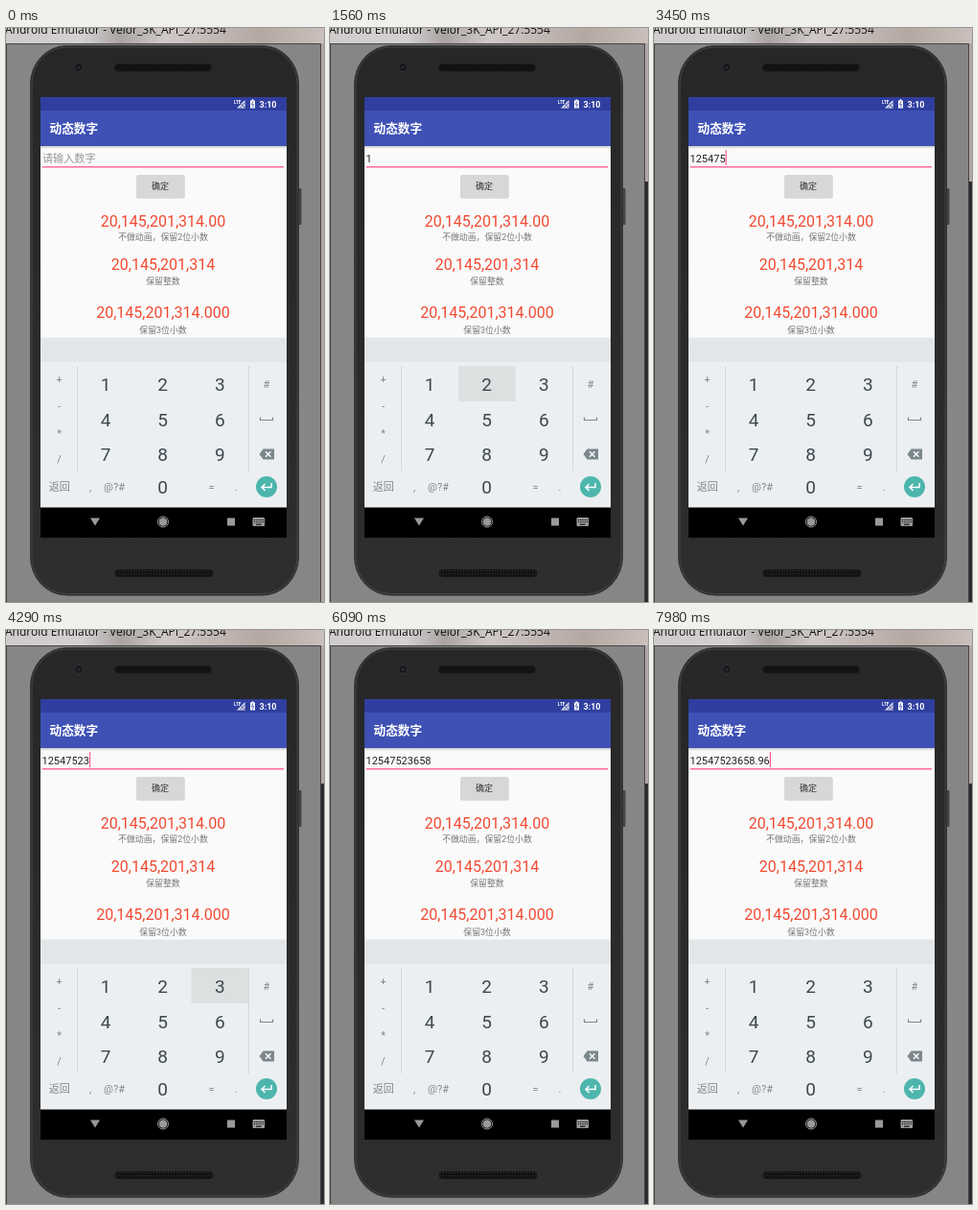
Write an HTML page that moves like this. It is 332x598 px and loops after 8 s.

```html
<!DOCTYPE html>
<html lang="zh-CN">
<head>
<meta charset="utf-8">
<title>动态数字</title>
<style>
  html, body { margin: 0; width: 100%; height: 100%; overflow: hidden; background: #868686; }
  svg { display: block; }
  text { font-family: Roboto, "Noto Sans CJK SC", "Noto Sans CJK", sans-serif; }
  .mid { text-anchor: middle; }
  .sum { font-size: 16px; fill: #f24a32; }
  .note { font-size: 8.9px; fill: #777; }
  .digit { font-size: 19px; fill: #3c484e; }
  .sign { font-size: 11px; fill: #7b878d; }
</style>
</head>
<body>
<svg id="stage" width="332" height="598" viewBox="0 0 332 598">
  <defs>
    <linearGradient id="bar">
      <stop offset="0" stop-color="#d0cccc"/>
      <stop offset=".24" stop-color="#d4d0d0"/>
      <stop offset=".36" stop-color="#aaa4a3"/>
      <stop offset=".5" stop-color="#cfc9c8"/>
      <stop offset=".8" stop-color="#b5a8a3"/>
      <stop offset="1" stop-color="#cabfba"/>
    </linearGradient>
    <linearGradient id="shell" x2="0" y2="1">
      <stop offset="0" stop-color="#272728"/>
      <stop offset="1" stop-color="#2e2e2f"/>
    </linearGradient>
    <linearGradient id="shade" x2="0" y2="1">
      <stop offset="0" stop-color="#000" stop-opacity=".2"/>
      <stop offset="1" stop-color="#000" stop-opacity="0"/>
    </linearGradient>
    <pattern id="mesh" width="3" height="3" patternUnits="userSpaceOnUse">
      <rect width="3" height="3" fill="#111"/>
      <circle cx="1.5" cy="1.5" r=".7" fill="#303030"/>
    </pattern>
  </defs>

  <!-- emulator window -->
  <rect width="332" height="598" fill="#868686"/>
  <rect width="332" height="16" fill="url(#bar)"/>
  <text x="-1" y="6" style="font:12px 'Open Sans','Noto Sans',sans-serif" fill="#111">Android Emulator - Velor_3K_API_27:5554</text>
  <path d="M0 16.5H328.5V598M.5 16V598" fill="none" stroke="#444"/>
  <rect x="329" y="16" width="3" height="582" fill="#b0a8a6"/>
  <rect id="edge" x="329" y="160" width="3" height="438" fill="#2b2b30"/>

  <!-- phone -->
  <rect x="304" y="167" width="4.5" height="38" rx="1" fill="#444"/>
  <rect x="25.5" y="18.5" width="280" height="572.5" rx="38" ry="40" fill="url(#shell)" stroke="#333"/>
  <rect x="27" y="20" width="277" height="569.5" rx="36.5" ry="38.5" fill="none" stroke="#454545"/>
  <circle cx="76" cy="41" r="4.5" fill="#171719" stroke="#333335"/>
  <circle cx="76" cy="41" r="1.6" fill="#2b2e3b"/>
  <rect x="113.5" y="37.5" width="101" height="7.5" rx="3.7" fill="#121212" stroke="#1b1b1b"/>
  <rect x="114" y="564.5" width="102" height="7" rx="3.5" fill="url(#mesh)" stroke="#151515"/>

  <!-- app -->
  <rect x="36" y="72" width="257" height="459" fill="#fafafa"/>
  <rect x="36" y="72" width="257" height="14" fill="#303f9f"/>
  <rect x="36" y="86" width="257" height="37" fill="#3f51b5"/>
  <rect x="36" y="123" width="257" height="3" fill="url(#shade)"/>
  <g fill="#fff">
    <text x="238" y="79" font-size="4.5" font-weight="700">LTE</text>
    <path d="M241 83.5L249.5 75V83.5Z" opacity=".85"/>
    <path d="M255 75.5H256.5V74.5H258.5V75.5H260V83.5H255Z"/>
    <text x="264.5" y="82.5" font-size="9" font-weight="700">3:10</text>
    <text x="45.5" y="108.7" font-size="12.7" font-weight="700">动态数字</text>
  </g>
  <path d="M244.5 78L249 83M249 78L244.5 83" stroke="#303f9f" stroke-width=".8"/>
  <path d="M257.8 76.5L256.4 79.7H258.6L257.3 82.5" fill="none" stroke="#303f9f" stroke-width=".8"/>
  <text id="hint" x="38" y="139.5" font-size="11.1" fill="#989898">请输入数字</text>
  <text id="entry" x="37.5" y="139.5" font-size="11" fill="#222"></text>
  <rect id="caret" y="127" width="1.2" height="16" fill="#ff5c93"/>
  <rect x="38" y="144" width="252" height="1.5" fill="#ff6b9d"/>
  <rect x="136" y="154" width="50.5" height="23.5" rx="2" fill="#c8c8c8"/>
  <rect x="136" y="153" width="50.5" height="24" rx="2" fill="#d6d7d7"/>
  <text class="mid" x="161" y="168.3" font-size="9" font-weight="500" fill="#333">确定</text>
  <text class="mid sum" x="164" y="206.5">20,145,201,314.00</text>
  <text class="mid note" x="164" y="221.3">不做动画，保留2位小数</text>
  <text class="mid sum" x="164" y="251.7">20,145,201,314</text>
  <text class="mid note" x="164" y="266.5">保留整数</text>
  <text class="mid sum" x="164" y="302">20,145,201,314.000</text>
  <text class="mid note" x="164" y="317.5">保留3位小数</text>

  <!-- keyboard -->
  <rect x="36" y="322.5" width="257" height="26" fill="#e2e6e8"/>
  <rect x="36" y="348" width="257" height="151.5" fill="#eceff1"/>
  <path d="M74.5 352V462M253.5 352V462" stroke="#d3d9dc"/>
  <rect id="press" fill="#dce0e1"/>
  <g id="keys"></g>
  <path d="M265.5 405.5V408.5H278.5V405.5" fill="none" stroke="#7b878d" stroke-width="1.2"/>
  <path d="M264.5 444L268.5 438.5H280V449.5H268.5Z" fill="#7b878d"/>
  <path d="M271 441.2L276.5 446.8M276.5 441.2L271 446.8" stroke="#fff" stroke-width="1.4"/>
  <circle cx="272" cy="478" r="11" fill="#4db6ac"/>
  <path d="M277 474V478.5H267M270.5 475L267 478.5L270.5 482" fill="none" stroke="#fff" stroke-width="1.5"/>

  <!-- navigation -->
  <rect x="36" y="499.5" width="257" height="31.5" fill="#000"/>
  <g fill="#9a9a9a">
    <path d="M88 510.5H98L93 518.5Z"/>
    <circle cx="164" cy="514.5" r="4.3"/>
    <circle cx="164" cy="514.5" r="5.5" fill="none" stroke="#9a9a9a"/>
    <rect x="231" y="510.5" width="8" height="8"/>
    <rect x="257.5" y="510" width="12.5" height="9" rx="1"/>
  </g>
  <path d="M259 512.5H269M259 514.7H269" stroke="#000" stroke-dasharray="1.2 1"/>
  <path d="M261 517.2H266.5" stroke="#000"/>
</svg>
<script>
const LOOP = 8000;
const $ = id => document.getElementById(id);

// key, pressed at, typed at, released at
const strokes = [
  ["1", 990, 1080, 1110], ["2", 1560, 1620, 1650], ["5", 1920, 2070, 2070],
  ["4", 2370, 2550, 2550], ["7", 2850, 2910, 2940], ["5", 3270, 3360, 3450],
  ["2", 3780, 3840, 3870], ["3", 4170, 4260, 4350], ["6", 4590, 4650, 4650],
  ["5", 5100, 5160, 5190], ["8", 5550, 5610, 5670], [".", 6750, 6810, 6960],
  ["9", 7380, 7590, 7590], ["6", 7860, 7920, 7980]
];

function label(text, x, y, kind) {
  const el = document.createElementNS("http://www.w3.org/2000/svg", "text");
  el.textContent = text;
  setAttrs(el, { class: "mid " + kind, x, y });
  $("keys").append(el);
}

function setAttrs(el, attrs) {
  for (const name in attrs) el.setAttribute(name, attrs[name]);
}

const show = (el, on) => el.setAttribute("visibility", on ? "visible" : "hidden");

for (let i = 0; i < 9; i++)
  label(i + 1, 104 + i % 3 * 59.7, 378 + Math.floor(i / 3) * 36.7, "digit");
label("0", 163.7, 485, "digit");
[["+", 55.5, 370], ["-", 55.5, 397.5], ["*", 55.5, 426], ["/", 55.5, 453], ["#", 272, 375],
 ["返回", 55.7, 482], [",", 88, 482], ["@?#", 113, 481.5], ["=", 214.5, 482], [".", 240, 482]]
  .forEach(([text, x, y]) => label(text, x, y, "sign"));

function keyBox(key) {
  if (key === ".") return { x: 224, y: 463, width: 33, height: 34 };
  const i = key - 1;
  return { x: 74.5 + i % 3 * 59.5, y: 352 + Math.floor(i / 3) * 37, width: 59.5, height: 37 };
}

function draw() {
  const t = performance.now() % LOOP;
  const typed = strokes.filter(s => t >= s[2]);
  const held = strokes.find(s => t >= s[1] && t < s[3]);
  const lastTyped = typed.length ? typed[typed.length - 1][2] : 0;

  $("entry").textContent = typed.map(s => s[0]).join("");
  show($("hint"), !typed.length);
  const end = typed.length ? $("entry").getComputedTextLength() : 0;
  $("caret").setAttribute("x", 37.5 + end);
  show($("caret"), t >= 30 && (t - lastTyped) % 930 < 480);
  show($("press"), held);
  if (held) setAttrs($("press"), keyBox(held[0]));
  show($("edge"), t >= 900);
  requestAnimationFrame(draw);
}
draw();
</script>
</body>
</html>
```
